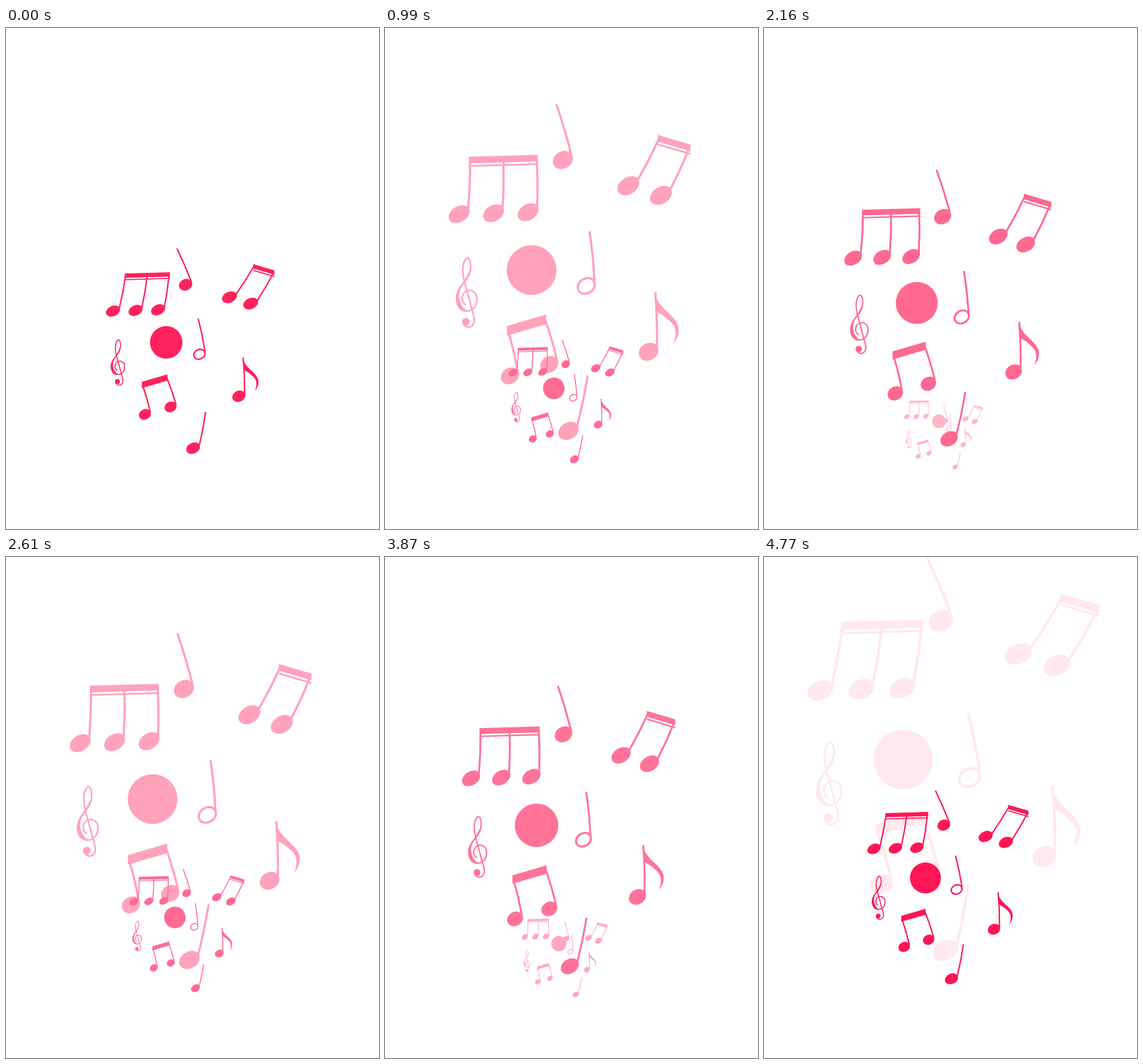
Animation, 596 px wide and 800 px high, one loop 4860 ms. Source, as an HTML page with a canvas:

```html
<!DOCTYPE html>
<html lang="en">
<head>
<meta charset="utf-8">
<title>Rising notes</title>
<style>
  html, body { margin: 0; width: 100%; height: 100%; overflow: hidden; background: #fff; }
  canvas { display: block; }
</style>
</head>
<body>
<canvas id="stage" width="596" height="800"></canvas>
<script>
const ctx = document.getElementById('stage').getContext('2d');
const STEP = 90, LOOP = 4860, CYCLE = 1620, LIFE = 3240;
const PINK = [255, 22, 84];

// Every figure grows out of its own vanishing point `from`.
// head: first note head, size: its radii, stem: head to stem top,
// sway: how far the top swings, step: offset to the next of `count` notes.
const NOTES = [
  { from: [270, 744], head: [171, 452], size: [11.8, 8.2], stem: [14, -60], sway: 5,
    count: 3, step: [36, -1], beam: 7, rail: true },
  { from: [297, 766], head: [357, 430], size: [12.4, 8.7], stem: [34, -53], sway: 4,
    count: 2, step: [34, 10], beam: 7, rail: true },
  { from: [264, 733], head: [222, 617], size: [10, 8.3], stem: [-4, -52], sway: -1,
    count: 2, step: [41, -12], beam: 10 },
  { from: [292, 786], head: [287, 410], size: [11, 9], stem: [-10, -58], sway: -4 },
  { from: [310, 723], head: [299, 671], size: [11.5, 8.6], stem: [20, -58], sway: 0 },
  { from: [279, 722], head: [372, 588], size: [10.8, 8.8], stem: [7, -62], sway: 0, flag: true },
  { from: [285, 727], head: [309, 521], size: [10.6, 8.8], stem: [1, -57], sway: -3, hollow: true }
];
const CLEF = { from: [270, 745], at: [179, 534] };
const DISC = { from: [297, 720], at: [256, 502] };

const growth = age => (age + 248) / 1868;
const swing = age => Math.cos(2 * Math.PI * (age - 1550) / 1750);
const opacity = age => Math.max(0, Math.min(1, (age - 100) / 1400, (3330 - age) / 1800));

function scaledFrom([x, y], s, draw) {
  ctx.save();
  ctx.translate(x, y);
  ctx.scale(s, s);
  ctx.translate(-x, -y);
  draw();
  ctx.restore();
}

function at([x, y], draw) {
  ctx.save();
  ctx.translate(x, y);
  draw();
  ctx.restore();
}

function line(x1, y1, x2, y2, width, bow = 0) {
  ctx.lineWidth = width;
  ctx.beginPath();
  ctx.moveTo(x1, y1);
  ctx.quadraticCurveTo((x1 + x2) / 2 + bow, (y1 + y2) / 2, x2, y2);
  ctx.stroke();
}

function drawHead([rx, ry], tilt, hollow) {
  const rim = hollow ? 1.2 : 0;
  ctx.beginPath();
  ctx.ellipse(0, 0, rx - rim, ry - rim, tilt, 0, 2 * Math.PI);
  if (hollow) {
    ctx.lineWidth = 2 * rim;
    ctx.stroke();
  } else ctx.fill();
}

function drawBeam(x, y, dx, dy, thick, rail) {
  ctx.beginPath();
  ctx.moveTo(x, y);
  ctx.lineTo(x + dx, y + dy);
  ctx.lineTo(x + dx, y + dy + thick);
  ctx.lineTo(x, y + thick);
  ctx.fill();
  const drop = y + thick * 1.4;
  if (rail) line(x, drop, x + dx, drop + dy, 1.8);
}

function drawFlag() {
  ctx.beginPath();
  ctx.moveTo(-1, 0);
  ctx.bezierCurveTo(4, 20, 24, 24, 24.5, 39);
  ctx.quadraticCurveTo(24.5, 47, 18.5, 54);
  ctx.quadraticCurveTo(25, 38, 15, 30);
  ctx.quadraticCurveTo(9, 24, 1, 20);
  ctx.fill();
}

function drawNote(note, sway) {
  const { size, count = 1, step = [0, 0], beam = 0 } = note;
  const tilt = -0.5 + 0.08 * sway;
  const topX = note.stem[0] + note.sway * sway, topY = note.stem[1];
  const footX = size[0] * 0.94 * Math.cos(tilt), footY = size[0] * 0.94 * Math.sin(tilt);
  at(note.head, () => {
    for (let i = 0; i < count; i++) {
      const inset = count > 1 ? 1.2 * (1 - 2 * i / (count - 1)) : 0;
      at([step[0] * i, step[1] * i], () => {
        line(topX + inset, topY + beam / 2, footX, footY, 2.3, 1.3);
        drawHead(size, tilt, note.hollow);
      });
    }
    const span = count - 1;
    if (beam) drawBeam(topX, topY, step[0] * span, step[1] * span, beam, note.rail);
    if (note.flag) at([topX, topY], drawFlag);
  });
}

function drawClef() {
  ctx.lineWidth = 1.6;
  ctx.beginPath();
  ctx.moveTo(-1, 13);
  ctx.bezierCurveTo(-8, 9, -5, -2, 3, -2);
  ctx.bezierCurveTo(14, -2, 13, 19, 0, 19.5);
  ctx.bezierCurveTo(-11, 20, -14, 5, -7, -5);
  ctx.bezierCurveTo(-2, -12, 4, -17, 4, -27);
  ctx.bezierCurveTo(4, -35, 1, -38, -1, -35);
  ctx.bezierCurveTo(-6, -29, -4, -17, -3, -13);
  ctx.lineTo(7, 24);
  ctx.bezierCurveTo(11, 36, 0, 40, -4, 32);
  ctx.stroke();
  // Swell of the left side
  ctx.beginPath();
  ctx.moveTo(4.5, -27);
  ctx.bezierCurveTo(4, -15, -9, -8, -8, 6);
  ctx.quadraticCurveTo(-7, 14, 0, 19.5);
  ctx.bezierCurveTo(-13, 18, -14, 5, -8, -5);
  ctx.quadraticCurveTo(1, -17, 4.5, -27);
  ctx.fill();
  drawDot(-1, 30.5, 4);
}

function drawDot(x, y, r) {
  ctx.beginPath();
  ctx.arc(x, y, r, 0, 2 * Math.PI);
  ctx.fill();
}

function drawCluster(age) {
  const alpha = opacity(age);
  if (!alpha || age > LIFE) return;
  const s = growth(age), sway = swing(age);
  const tint = PINK.map(c => Math.round(255 + (c - 255) * alpha));
  ctx.fillStyle = ctx.strokeStyle = `rgb(${tint})`;
  for (const note of NOTES) scaledFrom(note.from, s, () => drawNote(note, sway));
  scaledFrom(CLEF.from, s, () => at(CLEF.at, drawClef));
  scaledFrom(DISC.from, s, () => drawDot(...DISC.at, 26));
}

function render(now) {
  const t = Math.floor(now % LOOP / STEP) * STEP;
  ctx.globalCompositeOperation = 'source-over';
  ctx.fillStyle = '#fff';
  ctx.fillRect(0, 0, 596, 800);
  // Darken keeps overlapping parts of one tint even.
  ctx.globalCompositeOperation = 'darken';
  for (let wave = -1; wave < 3; wave++) drawCluster(t - wave * CYCLE);
}

const start = performance.now();
function tick() {
  render(performance.now() - start);
  requestAnimationFrame(tick);
}
tick();
</script>
</body>
</html>
```
